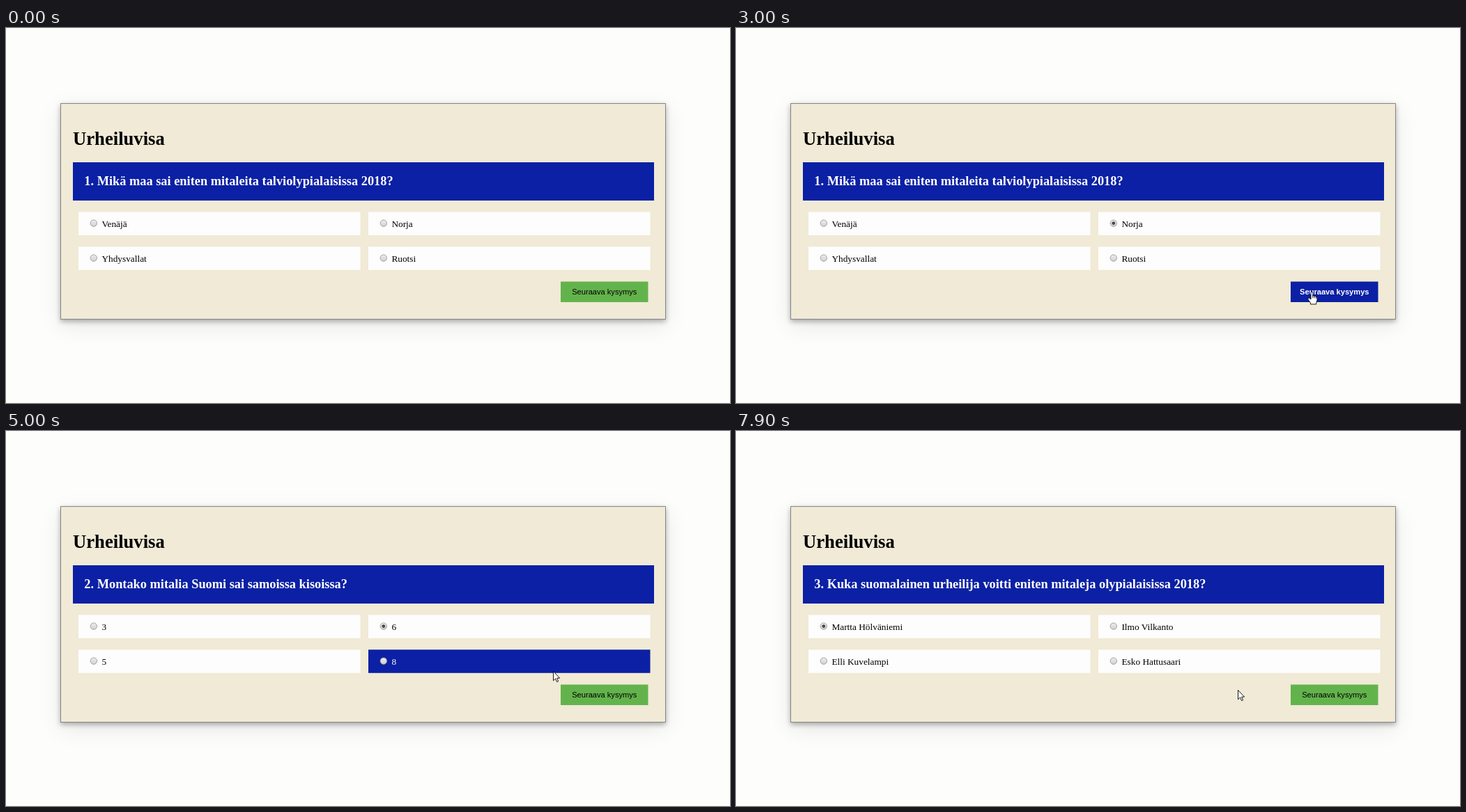
Write an HTML page that moves like this. It is 1039 by 539 pixels and loops after 8 s.

```html
<!DOCTYPE html>
<html lang="fi">
<head>
<meta charset="utf-8">
<title>Urheiluvisa</title>
<style>
  html, body { margin: 0; width: 100%; height: 100%; overflow: hidden; background: #fdfdfc; }
  .panel {
    position: absolute; left: 78px; top: 108px; width: 869px; height: 311px;
    box-sizing: border-box; border: 1px solid #85858a; background: #f0ead6;
    box-shadow: 0 3px 7px rgba(0,0,0,.3), 0 9px 30px rgba(0,0,0,.09);
  }
  svg { position: absolute; left: 0; top: 0; }
  text { font-family: "Liberation Serif", "Times New Roman", serif; font-size: 13.33px; }
  .title { font-size: 26.67px; font-weight: bold; }
  .question { font-size: 18.35px; font-weight: bold; fill: #fff; }
  .blue, .hover rect { fill: #0b20a4; }
  .hover text { fill: #fff; }
  .card rect { fill: #fdfdfd; }
  .card circle { fill: url(#knob); stroke: #999; stroke-width: .9; }
  .card .dot { display: none; fill: #484848; stroke: none; }
  .card.checked .dot { display: inline; }
  .button rect { fill: #63b34c; }
  .button text { font: 11.11px "Liberation Sans", Arial, sans-serif; text-anchor: middle; }
  .card.hover rect, .button.hover rect { fill: #0b20a4; }
  .button.hover text { font-weight: bold; }
  .pointer path { fill: #fff; stroke: #000; stroke-width: .9; stroke-linejoin: round; }
</style>
</head>
<body>
<div class="panel"></div>
<svg width="1039" height="539" viewBox="0 0 1039 539">
  <defs>
    <linearGradient id="knob" x2="0" y2="1">
      <stop stop-color="#eee"/><stop offset="1" stop-color="#d0d0d0"/>
    </linearGradient>
  </defs>
  <text class="title" x="96" y="168">Urheiluvisa</text>
  <rect class="blue" x="96" y="193" width="834" height="55"/>
  <text class="question" id="question" x="112.3" y="226"></text>
  <g id="cards"></g>
  <g class="button" id="button">
    <rect x="796" y="364.5" width="125.5" height="29.5"/>
    <text x="858.8" y="383">Seuraava kysymys</text>
  </g>
  <g class="pointer" id="pointer">
    <path id="arrow" d="M.5 .5V13.8L3.5 10.9L5.6 15.6L7.6 14.7L5.6 10.2H9.6Z"/>
    <g id="hand">
      <path d="M-1 1.6Q-1 .4 .4 .4T1.8 1.6V6Q3.2 5.2 4.2 6.5Q5.7 5.8 6.5 7.2Q8 6.8 8 8.6V12.4L6.7 15.6V18H-1.6V16L-5.2 10.8Q-5.6 8.9 -3.5 9L-1 11Z"/>
      <path d="M1.8 6V9M4.2 6.5V9.3M6.5 7.2V9.6"/>
    </g>
  </g>
</svg>
<script>
const LOOP = 8000, STEP = 100;
const byId = id => document.getElementById(id);

// Order of answers: left and right of the first row, then of the second.
const rounds = [
  { from: 0, checkAt: 2000, pick: 1,
    question: "1. Mikä maa sai eniten mitaleita talviolypialaisissa 2018?",
    answers: ["Venäjä", "Norja", "Yhdysvallat", "Ruotsi"] },
  { from: 3200, checkAt: 4500, pick: 1,
    question: "2. Montako mitalia Suomi sai samoissa kisoissa?",
    answers: ["3", "6", "5", "8"] },
  { from: 6100, checkAt: 7300, pick: 0,
    question: "3. Kuka suomalainen urheilija voitti eniten mitaleja olypialaisissa 2018?",
    answers: ["Martta Hölväniemi", "Ilmo Vilkanto", "Elli Kuvelampi", "Esko Hattusaari"] }
];

// Pointer track: time, x, y
const track = [
  [1000, 978, 98], [1200, 930, 135], [1400, 850, 200], [1600, 760, 262], [1800, 700, 282],
  [2000, 700, 282], [2200, 720, 292], [2300, 748, 297], [2400, 784, 333], [2500, 808, 358],
  [2600, 820, 374], [2800, 826, 381], [3000, 826, 379], [3400, 827, 379], [3500, 827, 379],
  [3700, 800, 355], [4000, 720, 305], [4200, 690, 288], [4300, 685, 285], [4500, 685, 285],
  [4800, 735, 310], [5000, 785, 345], [5200, 822, 374], [5300, 829, 378], [6000, 829, 378],
  [6300, 829, 377], [6400, 829, 377], [6600, 780, 350], [6800, 600, 320], [6900, 525, 305],
  [7000, 451, 291], [7200, 410, 283], [7300, 410, 283], [7500, 450, 297], [7600, 515, 318],
  [7800, 670, 362], [7900, 720, 372]
];

const cards = [0, 1, 2, 3].map(i => {
  const x = i % 2 ? 520 : 104, y = i < 2 ? 264 : 314;
  const knob = `cx="${x + 21.8}" cy="${y + 16.6}"`;
  byId("cards").insertAdjacentHTML("beforeend",
    `<g class="card"><rect x="${x}" y="${y + .3}" width="404.5" height="33.5"/>
     <circle ${knob} r="4.7"/><circle class="dot" ${knob} r="2.4"/>
     <text x="${x + 33.4}" y="${y + 22.4}"></text></g>`);
  const node = byId("cards").lastElementChild;
  return { node, label: node.querySelector("text"), box: [x, y, 404.5, 34] };
});
const buttonBox = [796, 364, 125, 30];

function pointerAt(t) {
  if (t < track[0][0]) return null;
  const next = track.findIndex(key => key[0] > t);
  if (next < 0) return track[track.length - 1].slice(1);
  const [t0, x0, y0] = track[next - 1], [t1, x1, y1] = track[next];
  const k = (t - t0) / (t1 - t0);
  return [x0 + (x1 - x0) * k, y0 + (y1 - y0) * k];
}

const inside = (p, [x, y, w, h]) =>
  !!p && p[0] >= x && p[0] <= x + w && p[1] >= y && p[1] <= y + h;

function render(t) {
  const round = rounds.filter(r => r.from <= t).pop();
  const pos = pointerAt(t);
  const lagged = pointerAt(t - STEP); // highlights trail the pointer by one step

  byId("question").textContent = round.question;
  cards.forEach(({ node, label, box }, i) => {
    label.textContent = round.answers[i];
    node.classList.toggle("hover", inside(lagged, box));
    node.classList.toggle("checked", i === round.pick && t >= round.checkAt);
  });
  byId("button").classList.toggle("hover", inside(lagged, buttonBox));

  byId("pointer").style.display = pos ? "" : "none";
  if (!pos) return;
  const onButton = inside(pos, buttonBox);
  byId("arrow").style.display = onButton ? "none" : "";
  byId("hand").style.display = onButton ? "" : "none";
  byId("pointer").setAttribute("transform", `translate(${pos.map(Math.round)})`);
}

const start = performance.now();
let shown = -1;
function tick() {
  const t = Math.floor((performance.now() - start) % LOOP / STEP) * STEP;
  if (t !== shown) render(shown = t);
  requestAnimationFrame(tick);
}
tick();
</script>
</body>
</html>
```
